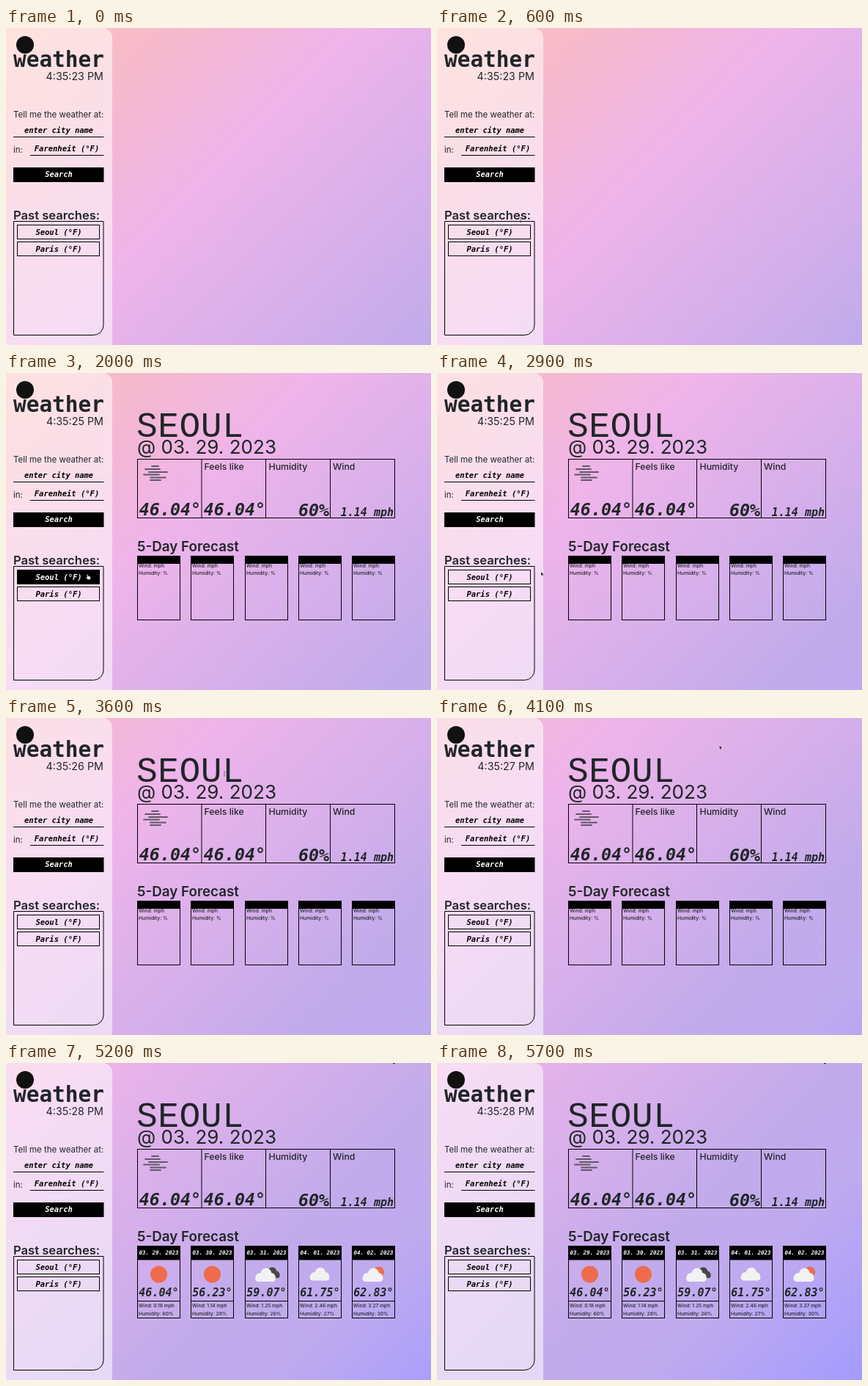
An HTML page for the animation above (5800 ms loop, 580x432 px).

```html
<!DOCTYPE html>
<html lang="en">
<head>
<meta charset="utf-8">
<title>weather</title>
<style>
  html, body { margin: 0; width: 100%; height: 100%; overflow: hidden; }
  #stage { position: relative; width: 580px; height: 432px; overflow: hidden; }
  #side { position: absolute; left: 0; top: 0; width: 145px; height: 432px;
    border-top-right-radius: 13px; background: rgba(255, 255, 255, .54); }
  svg { position: absolute; left: 0; top: 0; }
  text { font-family: Inter, "Open Sans", sans-serif; fill: #212529; white-space: pre; }
  .mono { font-family: "DejaVu Sans Mono", "Liberation Mono", monospace; font-weight: 700; }
  .ital { font-style: italic; }
  .thin { font-family: "Liberation Mono", monospace; letter-spacing: .01em; }
  .mid { text-anchor: middle; }
  .end { text-anchor: end; }
  .black { fill: #000; }
  .white { fill: #fff; }
  .med { font-weight: 500; }
  .semi { font-weight: 600; }
  .line { fill: none; stroke: #000; stroke-width: 1; }
  .hover rect { fill: #000; }
  .hover text { fill: #fff; }
</style>
</head>
<body>
<div id="stage"><div id="side"></div><svg id="art" width="580" height="432" viewBox="0 0 580 432"></svg></div>
<script>
const LOOP = 5800, STEP = 100;
const MAIN_AT = 1700, FORECAST_AT = 4200;
const SUN = '#ee6c4d', LIGHT = '#f2f2f2', DARK = '#484848';

// Gradient stops along x + y
const STOPS = [[0, '#ffc3b8'], [230, '#f6b9cc'], [480, '#efb4ea'], [1000, '#c2abeb'], [1170, '#bfaaef'], [1460, '#a39bff']];

// Pointer path: time, x, y
const PATH = [
  [0, 117, 257], [500, 117, 257], [1000, 103, 280], [1400, 102, 281], [2000, 112, 278],
  [2500, 113, 278], [2900, 142, 271], [3200, 200, 175], [3600, 298, 76], [4600, 473, -1], [5200, 528, -3]
];

const DAYS = [
  ['03. 29. 2023', '46.04°', '0.18', 60, 'sun'],
  ['03. 30. 2023', '56.23°', '1.14', 28, 'sun'],
  ['03. 31. 2023', '59.07°', '1.25', 26, 'broken'],
  ['04. 01. 2023', '61.75°', '2.46', 27, 'cloud'],
  ['04. 02. 2023', '62.83°', '3.27', 30, 'partly']
];

const text = (x, y, size, cls, str, id = '') =>
  `<text x="${x}" y="${y}" font-size="${size}" class="${cls}" ${id && `id="${id}"`}>${str}</text>`;
const box = (x, y, w, h, cls = 'line') => `<rect x="${x}" y="${y}" width="${w}" height="${h}" class="${cls}"/>`;
const path = (d, cls = 'line') => `<path d="${d}" class="${cls}"/>`;
const disc = (x, y, r, fill) => `<circle cx="${x}" cy="${y}" r="${r}" fill="${fill}"/>`;

const cloud = (x, y, k, fill) => `<g transform="translate(${x} ${y}) scale(${k})" fill="${fill}">
  <rect x="-14" y="-9" width="28" height="9" rx="4.5"/>
  <circle cx="-7.5" cy="-6.5" r="5.5"/><circle cx="1" cy="-11" r="7.5"/><circle cx="8" cy="-6.5" r="5.5"/></g>`;

const ICONS = {
  sun: x => disc(x, 288, 11.5, SUN),
  broken: x => cloud(x + 7, 293, .8, DARK) + cloud(x - 1.5, 298, 1, LIGHT),
  cloud: x => cloud(x - .5, 296.5, .96, LIGHT),
  partly: x => disc(x + 7, 285, 7.6, SUN) + cloud(x - 1, 298, 1, LIGHT)
};

const past = (id, y, str) =>
  `<g id="${id}">${box(15.5, y, 112, 19)}${text(72, y + 13.7, 10.5, 'mono ital mid black', str)}</g>`;

function sidebar() {
  return disc(26, 23, 12, '#111') +
    text(10, 52.6, 29.4, 'mono', 'weather') +
    text(133, 71, 14.3, 'end', '', 'clock') +
    text(10, 121.5, 11.5, '', 'Tell me the weather at:') +
    text(72, 143, 10.4, 'mono ital mid black', 'enter city name') +
    path('M10 148.5H133.5M33 173.5H133.5') +
    text(10, 169.5, 11.5, '', 'in:') +
    text(83, 167.5, 10.5, 'mono ital mid black', 'Farenheit (°F)') +
    box(10, 190, 123.5, 20, 'black') +
    text(72, 203, 10.4, 'mono ital mid white', 'Search') +
    text(10, 261, 16.6, 'semi', 'Past searches:') +
    path('M10.5 263.5H133V405A13.5 13.5 0 0 1 119.5 418.5H10.5Z') +
    past('seoul', 268.5, 'Seoul (°F)') + past('paris', 291.5, 'Paris (°F)');
}

function today() {
  const haze = 'M199 127h9M190 131h20M195 135h25M188 138.5h21M197 142.5h21M197 146h14';
  return text(178, 87, 48, 'thin', 'SEOUL') +
    text(179, 110, 26.1, '', '@ 03. 29. 2023') +
    box(179.5, 117.5, 351, 80) + path('M267 118V197M354.5 118V197M442.5 118V197') +
    `<path d="${haze}" stroke="#615968" stroke-width="1.8" stroke-linecap="round"/>` +
    text(270.5, 132, 12.3, 'med', 'Feels like') +
    text(358.5, 132, 12.3, 'med', 'Humidity') +
    text(446, 132, 12.3, 'med', 'Wind') +
    text(266, 194, 23.3, 'mono ital end', '46.04°') +
    text(354, 194, 23.3, 'mono ital end', '46.04°') +
    text(441, 195, 23.3, 'mono ital end', '60%') +
    text(529, 195, 15, 'mono ital end', '1.14 mph') +
    text(179, 243, 18.8, 'semi', '5-Day Forecast');
}

const cardX = i => Math.floor(179.5 + i * 73.3) + .5;

const emptyCard = (_, i) => {
  const x = cardX(i);
  return text(x + 1.5, 265, 6.8, 'med', 'Wind: mph') +
    text(x + 1.5, 274.5, 6.8, 'med', 'Humidity: %') +
    box(x, 250, 58, 10, 'black') + box(x, 249.5, 58, 87);
};

const fullCard = ([date, temp, wind, humid, icon], i) => {
  const x = cardX(i);
  return box(x, 250, 58, 18.5, 'black') + box(x, 249.5, 58, 98) +
    text(x + 29, 261.3, 7.5, 'mono ital mid white', date) +
    ICONS[icon](x + 29) +
    text(x + 56, 318, 15, 'mono ital end', temp) +
    path(`M${x} 324.5h58`) +
    text(x + 1.5, 333.3, 6.7, 'med', `Wind: ${wind} mph`) +
    text(x + 1.5, 343.5, 6.7, 'med', `Humidity: ${humid}%`);
};

const pointer = `<g id="pointer">
  <path id="arrow" d="M0 0V5.2L1.3 4.1L2.2 6L3 5.6L2.2 3.8H3.8Z" fill="#000" stroke="#fff" stroke-width=".4"/>
  <path id="beam" d="M-1 -3h2M0 -3V3M-1 3h2" fill="none" stroke="#555" stroke-width=".7"/>
  <path id="hand" d="M-1.6 -3.2q.8 -.8 1.4 .2L.5 -1.2L3 -.6Q3.8 0 3.4 1.6L2.8 3.4H-.4L-2.8 .8Q-2.6 -.2 -1.2 .4Z" fill="#fff" stroke="#000" stroke-width=".4"/>
</g>`;

const $ = id => document.getElementById(id);
$('art').innerHTML = sidebar() +
  `<g id="main">${today()}<g id="empty">${DAYS.map(emptyCard).join('')}</g>` +
  `<g id="full">${DAYS.map(fullCard).join('')}</g></g>` + pointer;

const show = (id, on) => { $(id).style.display = on ? '' : 'none'; };
const inside = (x, y, l, t, r, b) => x >= l && x <= r && y >= t && y <= b;

function pointerAt(t) {
  const i = PATH.findIndex(p => p[0] > t);
  if (i < 0) return PATH[PATH.length - 1].slice(1);
  const [t0, x0, y0] = PATH[i - 1], [t1, x1, y1] = PATH[i];
  const k = (t - t0) / (t1 - t0);
  return [x0 + (x1 - x0) * k, y0 + (y1 - y0) * k];
}

function draw(t) {
  const shift = 450 * Math.pow(t / 5700, 2);
  const stops = STOPS.map(([u, c]) => `${c} ${((u - shift) * Math.SQRT1_2).toFixed(1)}px`);
  $('stage').style.background = `linear-gradient(135deg, ${stops.join(', ')})`;

  $('clock').textContent = `4:35:${23 + Math.floor(t / 1000)} PM`;
  show('main', t >= MAIN_AT);
  show('empty', t < FORECAST_AT);
  show('full', t >= FORECAST_AT);

  const [x, y] = pointerAt(t);
  const onSeoul = inside(x, y, 16, 269, 128, 288);
  const onText = inside(x, y, 10, 248, 125, 262) || (t >= MAIN_AT && inside(x, y, 179, 52, 370, 114));
  $('seoul').classList.toggle('hover', onSeoul);
  $('pointer').setAttribute('transform', `translate(${x} ${y})`);
  show('hand', onSeoul);
  show('beam', onText);
  show('arrow', !onSeoul && !onText);
}

const start = performance.now();
function tick() {
  const t = (performance.now() - start) % LOOP;
  draw(Math.floor(t / STEP) * STEP);
  requestAnimationFrame(tick);
}
tick();
</script>
</body>
</html>
```
